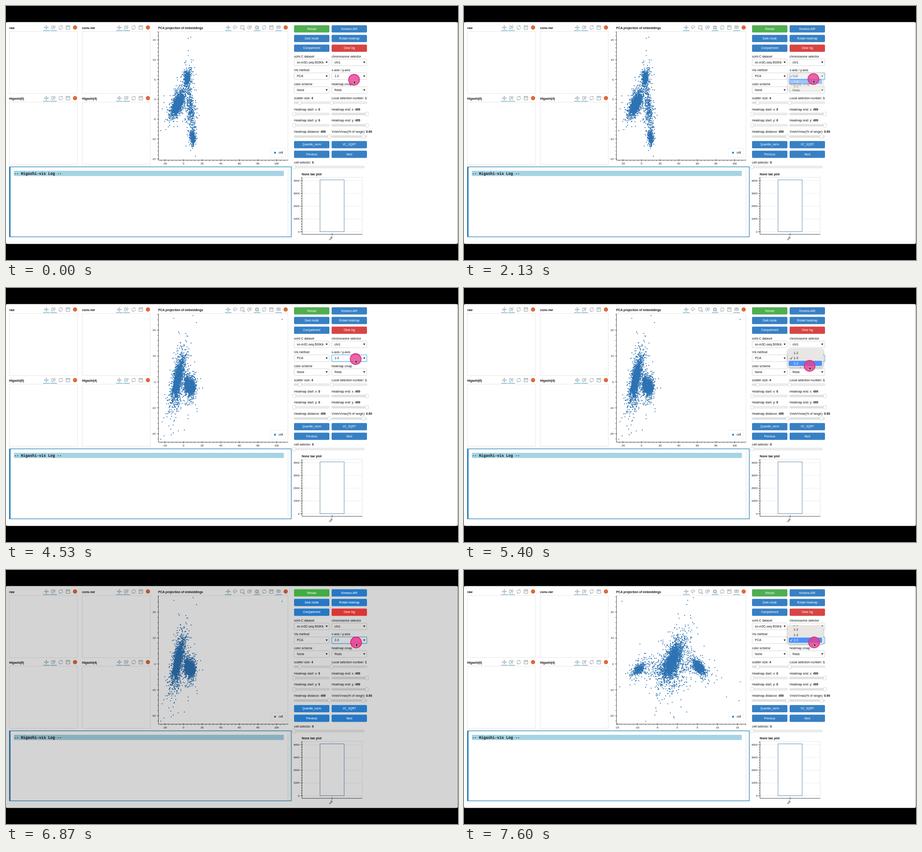
These frames come from a looping animation (998x561 px, 7.67 s). An HTML page:

```html
<!DOCTYPE html>
<html lang="en">
<head>
<meta charset="utf-8">
<title>Embedding viewer</title>
<style>
html, body { margin: 0; width: 100%; height: 100%; overflow: hidden; background: #000; }
svg { display: block; width: 998px; height: 561px; font-family: "Liberation Sans", Arial, sans-serif; }
text { white-space: pre; }
#menu { filter: drop-shadow(0 1px 2px rgba(0,0,0,.4)); }
.vivid { filter: contrast(1.2) brightness(.94); }
</style>
</head>
<body>
<svg id="stage" viewBox="0 0 998 561" xmlns="http://www.w3.org/2000/svg"></svg>
<script>
const LOOP = 7670;
const NS = "http://www.w3.org/2000/svg";
const LINE = "#e3e3e3", INK = "#222";
const BOLD = { "font-weight": 700 }, MIDDLE = { "text-anchor": "middle" }, END = { "text-anchor": "end" };
const stage = document.getElementById("stage");

function add(parent, tag, attrs = {}, content) {
  const e = document.createElementNS(NS, tag);
  for (const k in attrs) e.setAttribute(k, attrs[k]);
  if (content !== undefined) e.textContent = content;
  parent.appendChild(e);
  return e;
}
const group = (parent = stage, attrs) => add(parent, "g", attrs);
const rect = (p, x, y, width, height, fill, more) => add(p, "rect", { x, y, width, height, fill, ...more });
const circle = (p, cx, cy, r, fill, more) => add(p, "circle", { cx, cy, r, fill, ...more });
const frame = (p, x, y, w, h, stroke = LINE, width = 0.9, fill = "none", more) =>
  rect(p, x, y, w, h, fill, { stroke, "stroke-width": width, ...more });
const path = (p, d, stroke, width = 1, more) =>
  add(p, "path", { d, stroke, "stroke-width": width, fill: "none", ...more });
// y is the middle of the line of text
const label = (p, x, y, str, size = 6.8, more) =>
  add(p, "text", { x, y: y + size * 0.35, "font-size": size, fill: "#111", ...more }, str);

const base = group();
rect(base, 0, 0, 998, 561, "#000");
rect(base, 0, 35.5, 997.6, 490, "#fff", { rx: 3 });

// ---------- toolbars ----------
const ARM = "M0 0V-4.5M-1.5-3L0-4.5L1.5-3";
const TURN = "M-4 1A4 4 0 0 1 3-2.5M3-4.5V-2.5H1";
const ICON = {
  pan: [ARM, 4],
  wheel: ["M-4.5-2a1.8 1.8 0 0 1 3.6 0v4a1.8 1.8 0 0 1-3.6 0zM0-2a2 2 0 1 1 4 0a2 2 0 1 1-4 0M2 0V4", 1],
  reset: [TURN, 2],
  save: ["M-4-4H4V4H-4zM-2-4V-1H2V-4", 1],
  lasso: ["M-3 1A4 2.5 0 1 1 1 1.2L-3 1L-2 4", 1],
  box: ["M-4-4H3V3H-4zM2 5H5M3.5 3V6", 1],
  zoom: ["M-4 0a4 4 0 1 1 8 0a4 4 0 1 1-8 0M-2-2H2V2H-2zM3 3L5 5", 1],
  hover: ["M-4-3.5H4V2H1L0 3.5L-1 2H-4zM-2.5-2H2.5M-2.5 0H2.5", 1]
};
// names ending in * are switched on
function toolbar(x, y, names) {
  const step = 15.9;
  names.split(" ").forEach((n, i) => {
    const cx = x + i * step;
    const [d, turns] = ICON[n.replace("*", "")];
    for (let k = 0; k < turns; k++)
      path(base, d, "#8a8f94", 0.9, { transform: `translate(${cx} ${y}) rotate(${k * 360 / turns})` });
    if (n.endsWith("*")) rect(base, cx - 7, y + 6.4, 14.5, 1.1, "#3fa3d5");
  });
  circle(base, x + names.split(" ").length * step - 0.2, y, 4.7, "#e0683a");
}
function panel(x, y, h, title) {
  label(base, x, y - 7.5, title, 6.8, BOLD);
  frame(base, x + 0.3, y + 0.3, 150.5, h);
  toolbar(x + 82, y - 8.5, "pan* wheel* reset save");
}
["raw", "conv-rwr", "Higashi(0)", "Higashi(4)"].forEach((name, i) =>
  panel(7 + 161 * (i % 2), i < 2 ? 56 : 212, 137.3, name));

// ---------- scatter plot ----------
label(base, 336, 48.5, "PCA projection of embeddings", 6.8, BOLD);
toolbar(490.5, 47.5, "pan* lasso box wheel zoom* reset save hover*");
frame(base, 336.5, 56.5, 286, 283.5);

let seed = 20417;
function rnd() {
  seed = (seed + 0x6D2B79F5) | 0;
  let t = Math.imul(seed ^ (seed >>> 15), 1 | seed);
  t = (t + Math.imul(t ^ (t >>> 7), 61 | t)) ^ t;
  return ((t ^ (t >>> 14)) >>> 0) / 4294967296;
}
const gauss = () => Math.sqrt(-2 * Math.log(1 - rnd())) * Math.cos(2 * Math.PI * rnd());

// count, centre, spread, weight of the shared axis
const CLUSTERS = [
  [2350, [-6, -1.2, 1.4], [3.4, 1.4, 4.3], [.8, .75, .85]],
  [850, [4, 5.3, -1.2], [1.8, 1, 1.8], [.3, .75, -.75]],
  [400, [9.7, -9.6, -2.2], [1.5, 1, 1.6], [0, .75, .75]],
  [420, [8, -2.5, -1.8], [3.2, 4.2, 2.8], [-.5, .8, 0]],
  [120, [-7, -.5, -6], [4, 2, 4], [.4, .3, .4]]
];
// lone cells far from every cluster
const points = [[106, -13.8, 24.2], [7.8, 15.7, -6.9], [5, 15.4, -14.2], [-21, -.8, -20.8], [-11, -5.6, -19.7]];
for (const [n, mean, sd, k] of CLUSTERS)
  for (let i = 0; i < n; i++) {
    const u = gauss(), reach = 0.65 + 1.3 * rnd() ** 4;
    points.push(mean.map((m, j) => m + reach * sd[j] * (k[j] * u + Math.sqrt(1 - k[j] * k[j]) * gauss())));
  }

const axis = (zero, unit, step) => ({ step, at: v => zero + unit * v });
const WIDE = axis(392, 2.054, 20), DEEP = axis(207.5, -5.72, 10);
const VIEWS = [
  [0, 1, WIDE, axis(206.2, -8.75, 5)],
  [0, 2, WIDE, DEEP],
  [1, 2, axis(471, 8.85, 5), DEEP]
];
function ticks({ at, step }, lo, hi, each) {
  for (let i = -30; i <= 30; i++) {
    const v = i * step / 5, pos = at(v);
    if (pos >= lo && pos <= hi) each(pos, i % 5 === 0, v);
  }
}
const plots = VIEWS.map(([a, b, ax, ay]) => {
  const g = group(base);
  let dots = "", marks = "M336.5 56.5V340.5H623";
  for (const p of points) {
    const x = ax.at(p[a]), y = ay.at(p[b]);
    if (x > 337 && x < 622 && y > 57 && y < 339) dots += `M${x.toFixed(1)} ${y.toFixed(1)}h0`;
  }
  path(g, dots, "#2d72b2", 2.2, { "stroke-linecap": "round" });
  ticks(ax, 337, 622, (x, major, v) => {
    marks += `M${x} ${major ? 338.5 : 340.5}V${major ? 343.5 : 342.5}`;
    if (major) label(g, x, 348, v, 6, MIDDLE);
  });
  ticks(ay, 57, 340, (y, major, v) => {
    marks += `M${major ? 333.3 : 334.4} ${y}H${major ? 338 : 336.5}`;
    if (major) label(g, 330.5, y, v, 6, END);
  });
  path(g, marks, INK, 0.75);
  return g;
});
frame(base, 584, 314, 33, 19.5, "#ececec", 0.8, "#fff");
circle(base, 594, 324, 2.2, "#2f82bd");
label(base, 602, 324, "cell", 6.3);

// ---------- log ----------
frame(base, 7.5, 355.3, 622.5, 154.5, "#2d88b8", 1.3, "#fff");
rect(base, 7, 355, 3, 155, "#2b7fb8");
rect(base, 622, 356.5, 7, 152.5, "#fafafa");
path(base, "M622 356.5V509", "#e8e8e8", 0.8);
rect(base, 17.5, 364, 596, 11.5, "#a5d4e4");
label(base, 18, 369.7, "-- Higashi-vis Log --", 8.34, { ...BOLD, "font-family": "'Liberation Mono', monospace" });

// ---------- controls ----------
const column = i => 636 + 83 * (i % 2);
const line = i => Math.floor(i / 2);

const selects = [
  ["scHi-C dataset", "sn-m3C-seq-500Kb"], ["chromosome selector", "chr1"],
  ["Vis method", "PCA"], ["x-axis / y-axis", "1-2"],
  ["color scheme", "None"], ["heatmap cmap", "Reds"]
].map(([title, value], i) => {
  const x = column(i), y = 124.4 + 30.6 * line(i);
  label(base, x, y - 13.2, title);
  const box = frame(base, x + 0.3, y - 7.3, 77.4, 14.8, "#ccc", 0.8, "#fff", { rx: 2 });
  const text = label(base, x + 6.3, y, value);
  path(base, `M${x + 69.7} ${y - 1.6}h4.6l-2.3 3.6z`, "none", 0, { fill: INK });
  return { box, text };
});
const axes = selects[3];

// share is the knob's place along the track
function slider(x, y, title, value, share, width = 78) {
  add(label(base, x, y, title + ": "), "tspan", BOLD, value);
  const ty = y + 10.3, knob = x + share * width;
  frame(base, x, ty - 2.2, width, 4.4, "#d8d8d8", 0.7, "#ededed", { rx: 1.5 });
  rect(base, x, ty - 2, share * width, 4, "#e0e0e0", { rx: 1.5 });
  frame(base, knob - 3.4, ty - 4.2, 6.8, 8.4, "#cfcfcf", 0.8, "#fff", { rx: 1.8 });
}
[
  ["scatter size", "4", 0.16], ["Local selection number", "1", 0],
  ["Heatmap start: x", "0", 0], ["Heatmap end: x", "499", 1],
  ["Heatmap start: y", "0", 0], ["Heatmap end: y", "499", 1],
  ["Heatmap distance", "499", 1], ["Vmin/Vmax(% of range)", "0.90", 0.9]
].forEach(([title, value, share], i) => slider(column(i), 203.3 + 24.9 * line(i), title, value, share));
slider(636, 345.3, "cell selector", "0", 0, 155);

// ---------- bar plot ----------
label(base, 653, 372, "None bar plot", 6.8, BOLD);
frame(base, 653.5, 378.3, 133, 125.7);
let barMarks = "M653.5 378V504.3H786.5M720 502V507.5", grid = "M720 378V504";
ticks(axis(498.5, -0.02815, 1000), 378, 504, (y, major, v) => {
  barMarks += `M${major ? 650 : 651.3} ${y}H${major ? 655 : 653.5}`;
  if (!major) return;
  grid += `M654 ${y}H786`;
  label(base, 648, y, v, 6, END);
});
path(base, grid, "#e8e8e8", 0.8);
frame(base, 693.3, 384, 53.4, 114.5, "#4f7fa6", 0.9, "#fff");
path(base, barMarks, INK, 0.75);
label(base, 0, 0, "cell", 6, { ...MIDDLE, transform: "translate(717 513) rotate(-45)" });

// ---------- layers above the page ----------
const dim = rect(stage, 0, 35.5, 997.6, 490, "#000", { rx: 3, opacity: 0.17 });

const buttons = group();
const PAINT = { Reload: "#4fae50", "Clear log": "#d74543" };
["Reload", "Kmeans-ARI", "Dark mode", "Rotate heatmap", "Compartment", "Clear log",
  "Quantile_norm", "VC_SQRT", "Previous", "Next"].forEach((str, i) => {
  const x = column(i), y = (i < 6 ? 50.5 : 242.2) + 21.35 * line(i);
  rect(buttons, x, y - 8, 78, 16, PAINT[str] || "#3780c4", { rx: 2 });
  label(buttons, x + 39, y, str, 6.3, { ...MIDDLE, fill: "#fff" });
});

const OPTIONS = ["1-2", "1-3", "2-3"], ROW = 11.5;
const menu = group(stage, { id: "menu" });
rect(menu, 715, -2.7, 78, 40, "#e9e6e3", { rx: 3.5 });
const mark = rect(menu, 717, 0, 73.5, ROW, "#4a92fa", { rx: 2.2 });
const items = OPTIONS.map((s, i) => label(menu, 727.7, ROW * (i + 0.5), s, 7));
const check = path(menu, "M720 5.8l1.8 2.4l3-5", INK);

const cursor = group();
circle(cursor, 0, 0, 12, "rgba(233,62,146,.8)", { stroke: "#d63384", "stroke-width": 1.8 });
path(cursor, "M-.6 2v7l1.6-1.5l1.2 2.5l1.2-.6l-1.1-2.4h2.2z", "#fff", 0.5, { fill: "#111" });

// ---------- timing ----------
const HOME = [768.5, 163];
// start, end, x, y; the cursor rests between moves
const MOVES = [
  [0, 470, 773, 157], [730, 1270, 769.5, 158.8], [1270, 1600, 767.5, 161.8], [2070, 2600, 802, 158.3],
  [2740, 3000, 800, 160], [3670, 3670, 772, 157], [5130, 5400, 763, 172], [5870, 6130, 773, 160]
];
const PICK = [2070, 5930, Infinity];
const OPEN = [730, 5130, 7470];
const REDRAW = [3470, 7070];
const FADE = 130;

function place(t) {
  let [x, y] = HOME;
  for (const [a, b, tx, ty] of MOVES) {
    if (t < a) break;
    const k = t >= b ? 1 : (t - a) / (b - a);
    x += (tx - x) * k;
    y += (ty - y) * k;
  }
  return [x, y];
}
const passed = (times, t) => times.filter(s => t >= s).length;
const show = (e, on) => e.setAttribute("visibility", on ? "visible" : "hidden");

function drawMenu(t, pointerY) {
  const chosen = OPEN.findIndex((s, i) => t >= s && t < PICK[i] + FADE);
  show(menu, chosen >= 0);
  if (chosen < 0) return;
  const top = 149.2 - ROW * chosen, late = Math.max(0, t - PICK[chosen]);
  const row = late ? chosen + 1 : Math.max(0, Math.min(2, Math.floor((pointerY - top) / ROW)));
  const ink = i => i === row ? "#fff" : INK;
  menu.setAttribute("transform", `translate(0 ${top})`);
  menu.setAttribute("opacity", 1 - late / FADE);
  mark.setAttribute("y", row * ROW);
  items.forEach((e, i) => e.setAttribute("fill", ink(i)));
  check.setAttribute("transform", `translate(0 ${chosen * ROW})`);
  check.setAttribute("stroke", ink(chosen));
}

function draw(t) {
  const [x, y] = place(t);
  cursor.setAttribute("transform", `translate(${x.toFixed(2)} ${y.toFixed(2)})`);
  plots.forEach((p, i) => show(p, i === passed(REDRAW, t)));

  axes.text.textContent = OPTIONS[passed(PICK, t)];
  const focus = t >= OPEN[0];
  axes.box.setAttribute("stroke", focus ? "#66b5e6" : "#ccc");
  axes.box.setAttribute("stroke-width", focus ? 1.3 : 0.8);
  drawMenu(t, y);

  const flash = t >= 6870 && t < 6930;
  show(dim, flash);
  for (const g of [buttons, cursor]) g.classList.toggle("vivid", flash);
}

const start = performance.now();
function tick() {
  draw((performance.now() - start) % LOOP);
  requestAnimationFrame(tick);
}
draw(0);
requestAnimationFrame(tick);
</script>
</body>
</html>
```
